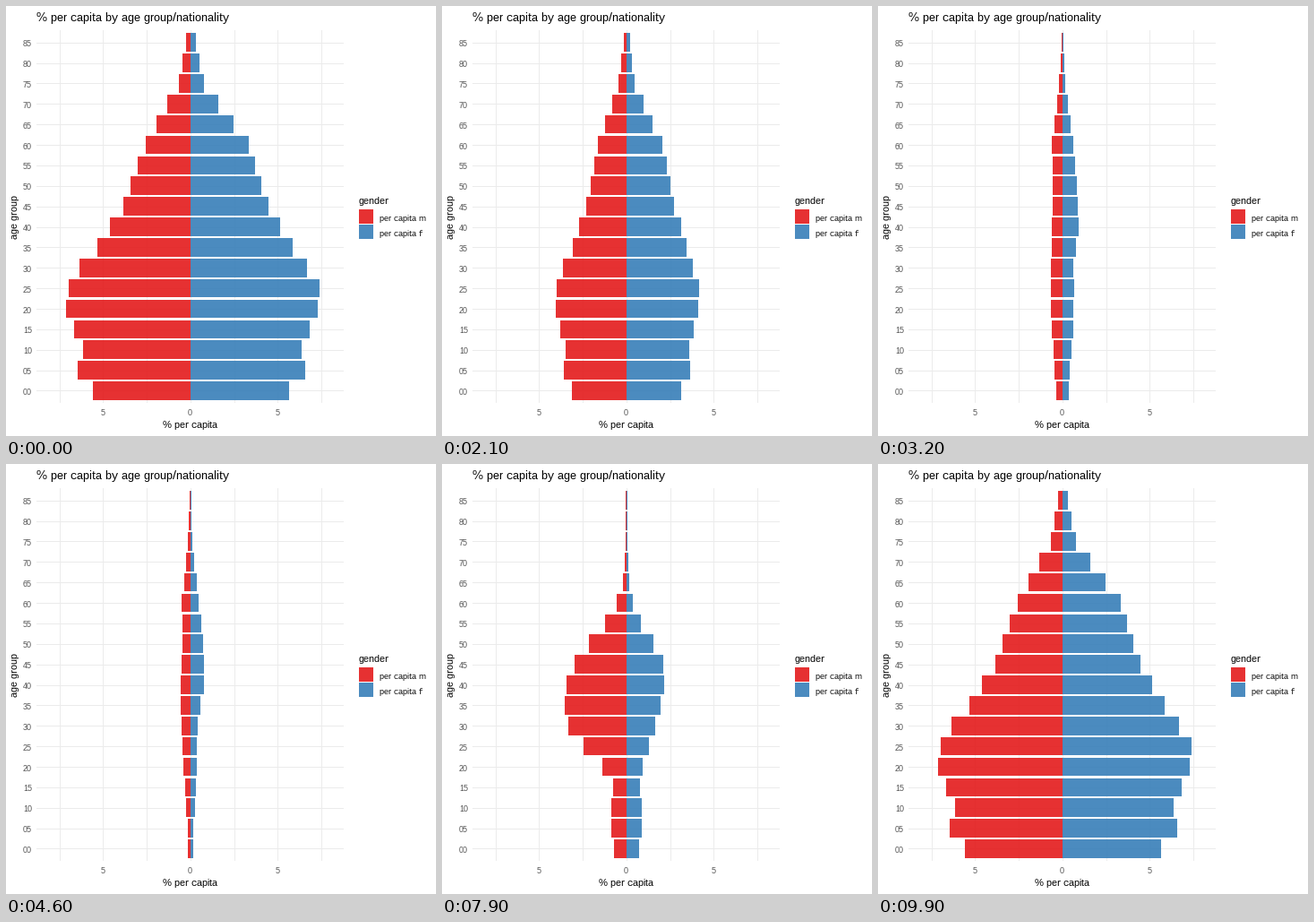
A matplotlib script that plays this animation: 480x480 px, repeating every 10 s.

```python
import matplotlib.pyplot as plt
import numpy as np
from matplotlib.animation import FuncAnimation
from matplotlib.patches import Rectangle

plt.rcParams.update({"font.family": "Liberation Sans",
                     "text.hinting": "native", "text.hinting_factor": 1})

SIZE, DPI = 480, 72          # at 72 dpi a point is a pixel
LEFT, RIGHT, TOP, BOTTOM = 34, 377, 27, 443
MID, UNIT = 205.8, 19.5      # zero of the x axis, pixels per percent
FIRST, STEP = 40.665, 22.8725
RED, BLUE, GRID, GREY = "#E41A1C", "#377EB8", "#EBEBEB", "#4D4D4D"

group = np.arange(18)        # five-year age groups, youngest first


def outline(knots, men, women):
    """Bar lengths in pixels along straight lines between key groups."""
    return np.array([np.interp(group, knots, men),
                     np.interp(group, knots, women)])


def bell(peak, center, young, old, power):
    """Hump with its own width on each side, above a small arch of children."""
    d = group - center
    width = np.where(d < 0, young, old)
    hump = peak * np.exp(-np.abs(d / width) ** power)
    children = 9.5 + 1.1 * group * (3 - group)
    return np.maximum(np.maximum(hump, children), 0.6)


wide = outline([0, 1, 2, 4, 5, 6, 7, 9, 12, 15, 17],
               [109, 126, 120, 139, 136, 124, 104, 75, 50, 13, 5],
               [110, 128, 124, 142, 144, 130, 114, 87, 65, 15, 6])
slim = outline([0, 1, 3, 6, 8, 10, 12, 15, 17],
               [2.4, 2.7, 6.1, 7.7, 8, 7.7, 9.6, 3, 0.8],
               [2.8, 3, 6.2, 6.9, 13.8, 13.4, 9.9, 2.2, 1.2])
bulge = np.array([bell(67, 7.2, 3.05, 3.65, 2.6),
                  bell(40.3, 8.6, 4.2, 2.3, 2)])

# Linear morphs between poses; the pose rests wherever two keys agree.
KEYS = [11, 33, 45, 66, 78, 99]
POSES = [wide, slim, slim, bulge, bulge, wide]

fig = plt.figure(figsize=(SIZE / DPI, SIZE / DPI), dpi=DPI, facecolor="white")
ax = fig.add_axes([0, 0, 1, 1])
ax.set_xlim(0, SIZE)
ax.set_ylim(SIZE, 0)
ax.axis("off")


def box(x, y, w, h, color, alpha=1, z=1):
    return ax.add_patch(Rectangle((x, y), w, h, facecolor=color, alpha=alpha,
                                  linewidth=0, antialiased=False, zorder=z))


def label(x, y, text, size, color="black", ha="left", rotation=0):
    ax.text(x, y, text, fontsize=size, color=color, ha=ha, va="baseline",
            rotation=rotation, rotation_mode="anchor")


for k in range(-3, 4):
    x = MID + 2.5 * k * UNIT
    box(round(x), TOP, 1, BOTTOM - TOP, GRID)
    if k in (-2, 0, 2):
        label(x - 0.5, 457, str(abs(k) * 5 // 2), 9, GREY, "center")

men, women = [], []
for g in group:
    y = FIRST + STEP * (17 - g)
    box(LEFT, round(y), RIGHT - LEFT, 1, GRID)
    label(29, round(y + 4.5), f"{5 * g:02d}", 9, GREY, "right")
    top, bottom = round(y - 0.45 * STEP), round(y + 0.45 * STEP)
    for side, color in ((men, RED), (women, BLUE)):
        side.append(box(MID, top, 1, bottom - top, color, 0.9, 2))

label(34, 17, "% per capita by age group/nationality", 13)
label(205.5, 471, "% per capita", 11, ha="center")
label(13, 235, "age group", 11, ha="center", rotation=90)

label(394, 221, "gender", 11)
for y, color, name in ((227, RED, "per capita m"), (244, BLUE, "per capita f")):
    box(394, y, 16, 16, color, 0.9)
    label(417, y + 13, name, 9)


def pose(n):
    i = int(np.clip(np.searchsorted(KEYS, n), 1, len(KEYS) - 1))
    t = np.clip((n - KEYS[i - 1]) / (KEYS[i] - KEYS[i - 1]), 0, 1)
    return POSES[i - 1] + (POSES[i] - POSES[i - 1]) * t


def update(n):
    zero = round(MID)
    for side, sign, lengths in zip((men, women), (-1, 1), pose(n)):
        for bar, length in zip(side, lengths):
            end = round(MID + sign * length)
            bar.set_x(min(zero, end))
            bar.set_width(abs(end - zero))
    return men + women


anim = FuncAnimation(fig, update, frames=100, interval=100,
                     repeat=True, repeat_delay=0, blit=False)
plt.show()
```
